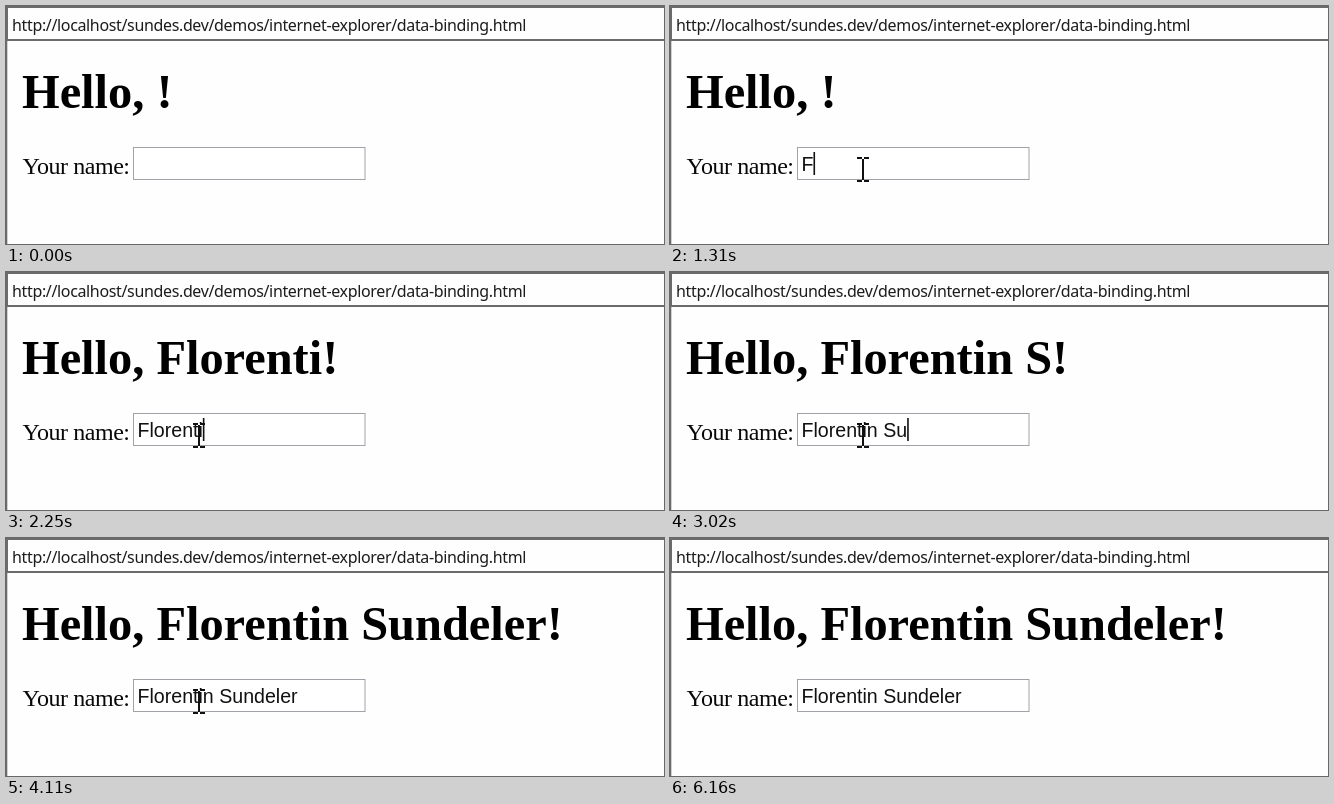
An HTML page that plays this animation: 658 px wide and 238 px high, repeating every 6.23 s.

```html
<!DOCTYPE html>
<html lang="en">
<head>
<meta charset="utf-8">
<title>Data binding</title>
<style>
  html, body { margin: 0; width: 100%; height: 100%; overflow: hidden; background: #fefefe; }
  svg { display: block; }
  text { white-space: pre; fill: #080808; }
  .url { font: 16px "Noto Sans", sans-serif; letter-spacing: -.35px; fill: #1c1c1c; }
  .title { font: bold 48.4px "Liberation Serif", serif; fill: #000; }
  .label { font: 24px "Liberation Serif", serif; letter-spacing: -.45px; }
  .value { font: 19.6px "Liberation Sans", sans-serif; fill: #111; }
</style>
</head>
<body>
<svg width="658" height="238">
  <path d="M0 0H658V2H2V33H658V35H1.3V238H0Z" fill="#6c6a6b"/>
  <text class="url" x="6" y="25">http://localhost/sundes.dev/demos/internet-explorer/data-binding.html</text>
  <text class="title" id="title" x="16" y="102"></text>
  <text class="label" x="16.5" y="168">Your name:</text>
  <rect x="127.5" y="141.5" width="231.5" height="32" fill="#fff" stroke="#a3a1a8"/>
  <text class="value" id="value" x="131.5" y="165"></text>
  <rect id="caret" y="146" width="1.6" height="23" fill="#111"/>
  <path id="beam" d="M-6-11h5M1-11h5M0-10V11M-6 12h5M1 12h5" fill="none" stroke="#111" stroke-width="2"/>
  <path id="arrow" d="M0 0V23L5.5 18L9.5 27L13 25.5L9 16.5H16.5Z" fill="#fff" stroke="#111" stroke-width="1.4"/>
</svg>
<script>
const LOOP = 6230, NAME = "Florentin Sundeler";
const [title, value, caret, beam, arrow] =
  ["title", "value", "caret", "beam", "arrow"].map(id => document.getElementById(id));

// time, letters in the field, letters in the heading
const typing = [
  [0, 0, 0], [1310, 1, 0], [1390, 1, 1], [1470, 2, 1], [1550, 2, 2], [1630, 3, 2], [1710, 4, 3],
  [1850, 5, 4], [1920, 6, 5], [2000, 6, 6], [2170, 8, 7], [2250, 8, 8], [2330, 10, 9], [2410, 10, 10],
  [2790, 11, 10], [2870, 11, 11], [3020, 12, 11], [3100, 13, 12], [3180, 14, 14],
  [3330, 15, 14], [3410, 17, 15], [3490, 18, 17], [3560, 18, 18]
];
const blinks = [690, 4110, 4680, 5210, 5760, 6160];
const rest = [193, 163];

const mix = (a, b, p) => a.map((v, i) => v + (b[i] - v) * p);

// The pointer moves in whole steps, easing to and from its resting place
function pointer(t) {
  if (t < 70 || t >= 4680) return null;
  if (t < 460) {
    const left = 1 - Math.floor((t - 70) / 78) / 5;
    return mix(rest, [336, 215], left ** 1.6);
  }
  if (t < 4200) return rest;
  const p = (Math.floor((t - 4200) / 80) + 1) / 6;
  return mix(rest, [547, 225], p ** 1.5);
}

function show(el, on) {
  el.style.display = on ? "" : "none";
}

function draw(now) {
  const t = now % LOOP;
  const [, typed, bound] = typing.findLast(step => step[0] <= t);
  value.textContent = NAME.slice(0, typed);
  title.textContent = `Hello, ${NAME.slice(0, bound)}!`;

  show(caret, blinks.filter(b => b <= t).length % 2);
  caret.setAttribute("x", 131.5 + (typed ? value.getComputedTextLength() : 0));

  const pos = pointer(t);
  const inField = pos && pos[0] < 359 && pos[1] < 174;
  show(beam, inField);
  show(arrow, pos && !inField);
  if (pos) (inField ? beam : arrow).setAttribute("transform", `translate(${pos})`);
  requestAnimationFrame(draw);
}
requestAnimationFrame(draw);
</script>
</body>
</html>
```
